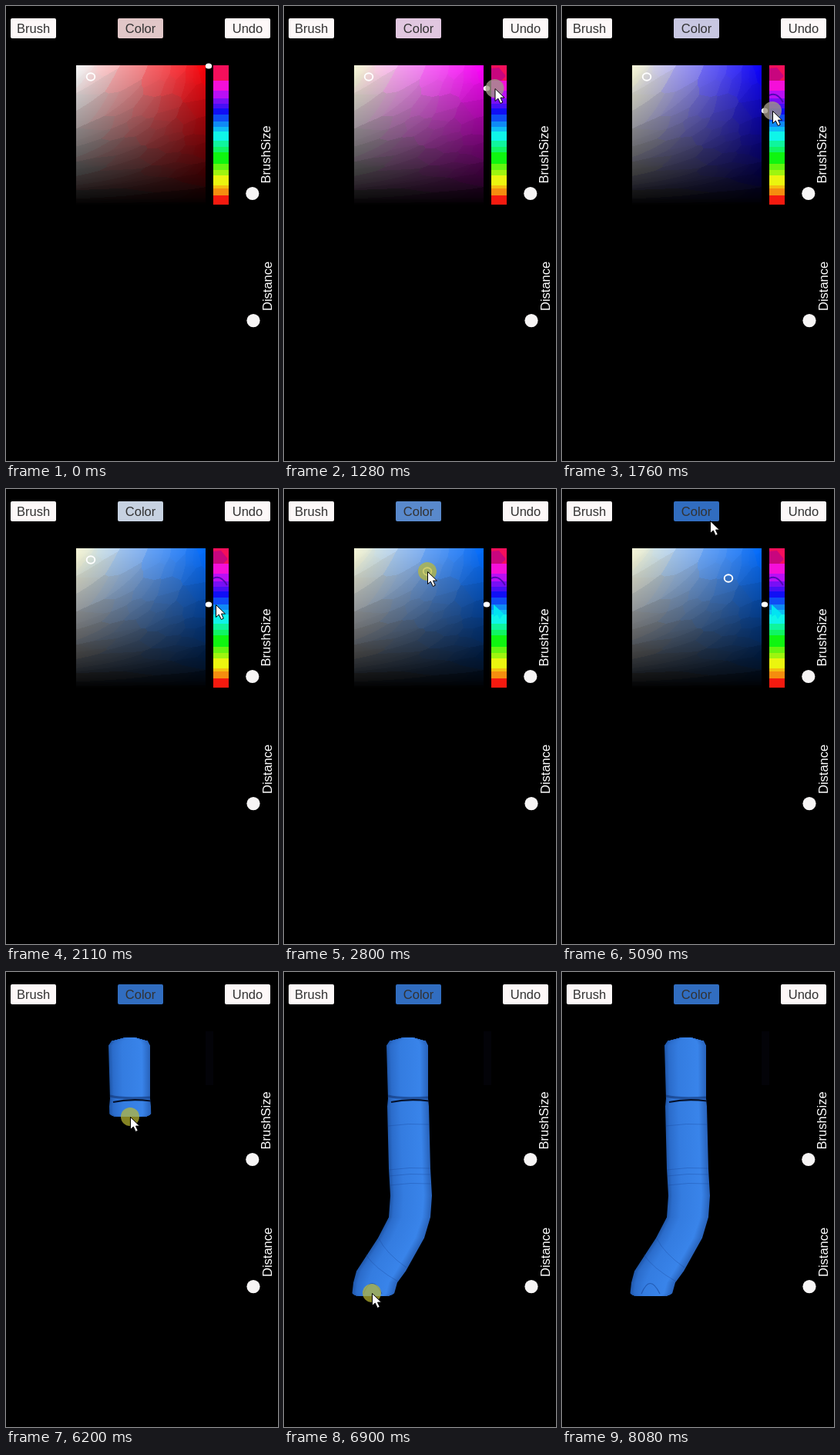
Write an HTML page with a canvas that moves like this. It is 353 px wide and 591 px high and loops after 8.89 s.

```html
<!DOCTYPE html>
<html lang="en">
<head>
<meta charset="utf-8">
<title>Tube painter</title>
<style>
  html, body { margin: 0; width: 100%; height: 100%; overflow: hidden; background: #000; }
  canvas { display: block; width: 353px; height: 591px; }
</style>
</head>
<body>
<canvas id="stage" width="353" height="591"></canvas>
<script>
const ctx = document.getElementById('stage').getContext('2d');
const LOOP = 8890, STEP = 70;
const BOX = { x: 91, y: 77, w: 168, h: 181 };
const FONT = '16.5px "Liberation Sans", Arial, sans-serif';

// Pointer moves: start time, then points as step, x, y. It rests after each move.
const MOVES = {
  100: [[0, 329, 572], [7, 288, 112]],
  870: [[0, 280, 95], [1, 274, 80], [9, 273, 134]],
  1760: [[0, 273, 136], [3, 272, 150], [5, 272, 150], [9, 188, 107]],
  2660: [[0, 187, 107], [2, 186, 107], [6, 154, 150], [8, 182, 164], [12, 211, 139]],
  3580: [[0, 211, 138], [3, 208, 161], [7, 216, 116]],
  4610: [[0, 223, 112], [2, 222, 85], [6, 192, 41]],
  5290: [[0, 190, 40], [1, 187, 38]],
  5580: [[0, 186, 38], [4, 160, 90], [8, 161, 188], [11, 163, 264]],
  6480: [[0, 164, 285], [2, 162, 320], [6, 114, 417], [8, 114, 417], [12, 179, 30]],
  7390: [[0, 240, 22], [1, 304, 8]],
  7800: [[0, 312, 561], [3, 324, 582]]
};
const STARTS = Object.keys(MOVES).map(Number);
const HUE_DRAG = [940, 2110], SHADE_DRAG = [2390, 4340], TAP = [5580, 5650], PAINT = [5860, 7040];

// Tube silhouette: y, left edge, right edge.
const TUBE = [
  [85, 152, 170], [89, 137, 184], [95, 133, 187], [164, 135, 187],
  [174, 134, 188], [255, 136, 190], [290, 138, 192], [318, 136, 190],
  [345, 122, 182], [388, 94, 158], [403, 90, 147], [421, 88, 142]
];

// Edges of the hue bar's flat bands.
const BANDS = [77, 97, 110, 120, 127, 133, 141, 150, 157, 163, 175, 183, 190, 205, 213, 220, 233, 237, 246, 258];

const within = (t, [from, to]) => t >= from && t < to;

function sample(table, t) {
  const i = table.findIndex(row => row[0] > t);
  if (i < 0) return table[table.length - 1].slice(1);
  if (i === 0) return table[0].slice(1);
  const a = table[i - 1], b = table[i], k = (t - a[0]) / (b[0] - a[0]);
  return a.slice(1).map((v, j) => v + (b[j + 1] - v) * k);
}

function pointerAt(t) {
  const start = STARTS.filter(s => s <= t).pop() ?? STARTS[0];
  return sample(MOVES[start], Math.floor((t - start) / STEP));
}

function hsv(h, s, v) {
  return [5, 3, 1].map(n => {
    const k = (n + h / 60) % 6;
    return 255 * v * (1 - s * Math.max(0, Math.min(k, 4 - k, 1)));
  });
}

const hueAt = y => 360 * (1 - Math.min(1, Math.max(0, (y - BOX.y) / BOX.h)));
const shadeAt = (x, y) => [(x - BOX.x) / BOX.w, 1 - (y - BOX.y) / BOX.h];

// The shade square is posterised into irregular cells along lines of equal lightness.
const tone = ([s, v]) => [v * (1 - 0.7 * s), v * s];
let seed = 7;
const random = () => (seed = seed * 16807 % 2147483647) / 2147483647;
const cells = Array.from({ length: 90 }, () => [random(), random()]);
const cellTones = cells.map(tone);
const square = document.createElement('canvas');
square.width = BOX.w;
square.height = BOX.h;
const sctx = square.getContext('2d');
const image = sctx.createImageData(BOX.w, BOX.h);
const cellOf = new Uint8Array(BOX.w * BOX.h);
for (let i = 0; i < cellOf.length; i++) {
  const [l, c] = tone([i % BOX.w / BOX.w, 1 - Math.floor(i / BOX.w) / BOX.h]);
  let best = 9;
  cellTones.forEach(([cl, cc], j) => {
    const d = 5 * (l - cl) ** 2 + (c - cc) ** 2;
    if (d < best) { best = d; cellOf[i] = j; }
  });
}

let squareHue = -1;
function updateSquare(hue) {
  if (hue === squareHue) return;
  squareHue = hue;
  const flat = cells.map(([s, v]) => hsv(hue, s, v));
  const warm = hue < 320 ? 30 : 0;
  for (let i = 0; i < cellOf.length; i++) {
    const s = i % BOX.w / BOX.w, v = 1 - Math.floor(i / BOX.w) / BOX.h;
    const smooth = hsv(hue, s, v), cell = flat[cellOf[i]];
    for (let c = 0; c < 3; c++) image.data[i * 4 + c] = smooth[c] * 0.6 + cell[c] * 0.4;
    image.data[i * 4 + 2] -= warm * Math.exp(-12 * (s * s + (1 - v) ** 2));
    image.data[i * 4 + 3] = 255;
  }
  sctx.putImageData(image, 0, 0);
}

function ellipse(x, y, rx, ry, fill) {
  ctx.beginPath();
  ctx.ellipse(x, y, rx, ry, 0, 0, 7);
  ctx.fillStyle = fill;
  ctx.fill();
}

function button(x, label, fill) {
  ctx.fillStyle = fill;
  ctx.beginPath();
  ctx.roundRect(x, 16, 59, 26, 2);
  ctx.fill();
  ctx.fillStyle = '#323232';
  ctx.textAlign = 'center';
  ctx.fillText(label, x + 29.5, 35);
}

function slider(label, x, bottom, knobX, knobY) {
  ctx.save();
  ctx.translate(x, bottom);
  ctx.rotate(-Math.PI / 2);
  ctx.fillStyle = '#fff';
  ctx.textAlign = 'left';
  ctx.fillText(label, 0, 0);
  ctx.restore();
  ellipse(knobX, knobY, 8.6, 8.6, '#f7f5f5');
}

function polygon(points, fill) {
  ctx.beginPath();
  points.forEach(([x, y]) => ctx.lineTo(x, y));
  ctx.closePath();
  ctx.fillStyle = fill;
  ctx.fill();
}

function curve(x1, y1, cx, cy, x2, y2, stroke, width) {
  ctx.beginPath();
  ctx.moveTo(x1, y1);
  ctx.quadraticCurveTo(cx, cy, x2, y2);
  ctx.strokeStyle = stroke;
  ctx.lineWidth = width;
  ctx.stroke();
}

function drawPicker(t, hueY, ringX, ringY) {
  updateSquare(hueAt(hueY));
  ctx.drawImage(square, BOX.x, BOX.y);
  BANDS.slice(1).forEach((end, i) => {
    const top = BANDS[i], hue = end === 258 ? 3 : hueAt((top + end) / 2);
    ctx.fillStyle = `rgb(${hsv(hue, 0.94, 0.96).map(Math.round)})`;
    ctx.fillRect(269, top, 20, end - top);
  });
  // Traces left on the bar by the pointer.
  if (t > 1100) polygon([[269, 81], [279, 80], [288, 91], [282, 97], [269, 97]], '#c8067e');
  if (t > 1500) curve(269, 116, 279, 111, 287, 125, '#5208b4', 2);
  if (t > 2110) polygon([[272, 150], [272, 166], [277, 163], [280, 169], [285, 162]], '#02e4f2');
  ellipse(263, hueY, 4.2, 3.6, '#fff');
  ctx.beginPath();
  ctx.ellipse(ringX, ringY, 5.3, 4.7, 0, 0, 7);
  ctx.strokeStyle = '#fff';
  ctx.lineWidth = 1.9;
  ctx.stroke();
}

const skin = ctx.createLinearGradient(0, 0, 1, 0);
skin.addColorStop(0, '#1f56a8');
skin.addColorStop(0.1, '#2b6ccb');
skin.addColorStop(0.32, '#347ce0');
skin.addColorStop(0.8, '#3984ea');
skin.addColorStop(1, '#2862ba');

function drawTube(bottom) {
  ctx.fillStyle = skin;
  for (let y = 85; y < bottom; y++) {
    const [left, right] = sample(TUBE, y);
    const inset = 8 * Math.max(0, 1 - (bottom - y) / 5) ** 2;
    ctx.save();
    ctx.translate(left + inset, y);
    ctx.scale(right - left - 2 * inset, 1);
    ctx.fillRect(0, 0, 1, 1);
    ctx.restore();
  }
  if (bottom > 170) {
    curve(135, 161, 150, 165, 187, 163, 'rgba(18,52,116,.6)', 3);
    curve(139, 169, 162, 164, 188, 167.5, '#06122c', 2.2);
  }
  const seam = 'rgba(20,62,140,.3)';
  [198, 255, 263, 275].filter(y => y < bottom - 4).forEach(y => {
    const [left, right] = sample(TUBE, y);
    curve(left, y + 2, (left + right) / 2, y - 2, right, y, seam, 1);
  });
  if (bottom > 390) {
    curve(123, 346, 132, 365, 159, 384, seam, 1);
    curve(106, 367, 118, 385, 148, 402, seam, 1);
  }
  if (bottom > 415) curve(103, 418, 114, 391, 127, 418, 'rgba(20,62,140,.55)', 1.2);
}

function drawPointer(x, y) {
  ctx.save();
  ctx.translate(x + 0.5, y + 0.5);
  polygon([[0, 0], [0, 16], [3.8, 12.6], [6.8, 19], [9.8, 17.6], [7, 11.6], [12, 11.6]], '#fff');
  ctx.strokeStyle = '#000';
  ctx.lineWidth = 1;
  ctx.stroke();
  ctx.restore();
}

function draw(t) {
  const [x, y] = pointerAt(t);
  const last = drag => pointerAt(Math.min(t, drag[1]));
  const hueY = t < HUE_DRAG[0] ? 78 : last(HUE_DRAG)[1];
  const [ringX, ringY] = t < SHADE_DRAG[0] ? [110, 92] : last(SHADE_DRAG);
  const color = hsv(hueAt(hueY), ...shadeAt(ringX, ringY)).map(c => Math.round(c * 0.96));

  ctx.fillStyle = '#000';
  ctx.fillRect(0, 0, 353, 591);
  ctx.font = FONT;
  button(6, 'Brush', '#fdf8f8');
  button(145, 'Color', `rgb(${color})`);
  button(284, 'Undo', '#fdf8f8');
  slider('BrushSize', 343, 230.5, 319.8, 243.5);
  slider('Distance', 344.5, 396, 321, 408.6);

  if (t < TAP[1]) {
    drawPicker(t, hueY, ringX, ringY);
  } else {
    ctx.fillStyle = '#030308';
    ctx.fillRect(259, 77, 10, 70);
  }
  if (t >= PAINT[0]) drawTube(Math.min(421, Math.round(last(PAINT)[1]) + (t > 6900 ? 4 : 0)));

  if (within(t, HUE_DRAG)) ellipse(x, y, 12, 12, 'rgba(160,150,135,.8)');
  if ([SHADE_DRAG, TAP, PAINT].some(span => within(t, span))) ellipse(x, y, 12, 12, 'rgba(190,186,50,.7)');
  if (within(t, [100, 7530]) || within(t, [7800, 8080])) drawPointer(x, y);
}

const began = performance.now();
function tick() {
  draw((performance.now() - began) % LOOP);
  requestAnimationFrame(tick);
}
tick();
</script>
</body>
</html>
```
